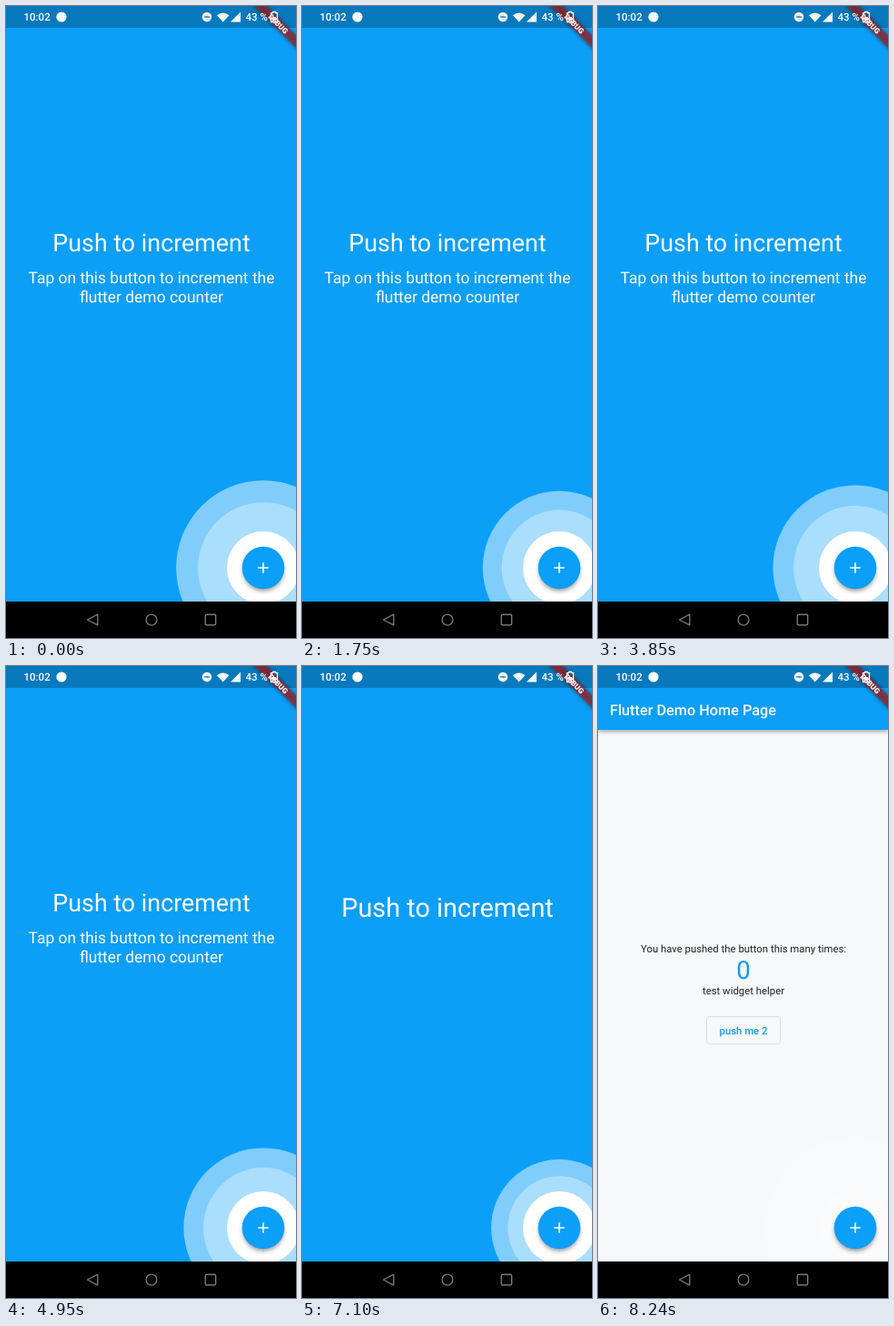
These frames come from a looping animation (319x693 px, 8340 ms). An HTML page:

```html
<!DOCTYPE html>
<html lang="en">
<head>
<meta charset="utf-8">
<style>
  html, body { margin: 0; width: 100%; height: 100%; overflow: hidden; background: #000; }
  svg { display: block; width: 319px; height: 693px; font-family: Roboto, sans-serif; text-rendering: geometricPrecision; }
  .mid { text-anchor: middle; }
  .medium { font-weight: 500; }
  .blue { fill: #0b9ff8; }
  .white { fill: #fff; }
</style>
</head>
<body>
<svg viewBox="0 0 319 693">
  <defs>
    <filter id="soft" x="-50%" y="-50%" width="200%" height="200%"><feGaussianBlur stdDeviation="2.5"/></filter>
  </defs>

  <g id="home">
    <rect width="319" height="653" fill="#fafafa"/>
    <rect y="24" width="319" height="47.5" opacity=".4" filter="url(#soft)"/>
    <rect class="blue" width="319" height="70"/>
    <text class="white medium" x="13" y="53.5" font-size="16.25">Flutter Demo Home Page</text>
    <g class="mid" font-size="11.37" fill="#222">
      <text x="160" y="314.3">You have pushed the button this many times:</text>
      <text x="160" y="342.5" font-size="27.6" fill="#159cf0">0</text>
      <text x="160" y="359.5">test widget helper</text>
      <text class="medium" x="160" y="403.7" fill="#159cf0">push me 2</text>
    </g>
    <rect x="119.5" y="384.5" width="81" height="30" rx="3" fill="none" stroke="#dfe2e5"/>
  </g>

  <g id="overlay">
    <rect class="blue" width="319" height="653"/>
    <g class="white">
      <circle id="outer" cx="283" cy="616" opacity=".48"/>
      <circle id="inner" cx="283" cy="616" opacity=".33"/>
      <circle cx="283" cy="616" r="40"/>
    </g>
    <g class="mid white">
      <text id="title" x="160" y="268.5" font-size="26.85">Push to increment</text>
      <g id="description" font-size="17.45">
        <text x="160" y="304.2">Tap on this button to increment the</text>
        <text x="160" y="325.2">flutter demo counter</text>
      </g>
    </g>
  </g>

  <g id="button">
    <circle cx="283" cy="619" r="22.5" opacity=".4" filter="url(#soft)"/>
    <circle class="blue" cx="283" cy="616" r="23.3"/>
    <path d="M277.3 616h11.4M283 610.3v11.4" stroke="#fff" stroke-width="1.7"/>
  </g>

  <rect id="status-shade" width="319" height="24" opacity=".24"/>

  <g id="banner" transform="translate(319 0) rotate(45)">
    <rect x="-40" y="22.75" width="80" height="9.75" opacity=".45" filter="url(#soft)"/>
    <rect x="-40" y="22.75" width="80" height="9.75" fill="#b71c1c" opacity=".63"/>
    <text class="mid white" y="30.6" font-size="8.3" font-weight="900">DEBUG</text>
  </g>

  <g id="status" class="white medium" font-size="11.5">
    <text x="19.5" y="16">10:02</text>
    <circle cx="61" cy="12" r="5.6"/>
    <circle cx="221" cy="12" r="5.2"/>
    <path d="M218.2 12h5.6" stroke="#0f7bbf" stroke-width="1.5"/>
    <path d="M232 10.2Q238.7 5 245.400 10.2L238.700 17.500Z"/>
    <path d="M258 6.500V17.500H247Z"/>
    <text x="263.500" y="16">43 %</text>
    <path d="M293.500 6.500h3v1.200h2v9.800h-7V7.700h2z" fill="none" stroke="#fff" stroke-width="1.3"/>
    <rect x="293" y="12" width="4" height="4"/>
  </g>

  <g id="navigation" fill="none" stroke="#777" stroke-width="1.4" stroke-linejoin="round">
    <rect y="653" width="319" height="40" fill="#000" stroke="none"/>
    <path d="M89.500 673L100.800 667.200V678.800Z"/>
    <circle cx="160" cy="673" r="5.900"/>
    <rect x="219.300" y="667.300" width="11.400" height="11.400" rx="1.500"/>
  </g>
</svg>

<script>
  const LOOP = 8340;
  const [overlay, outer, inner, title, description] =
    ['overlay', 'outer', 'inner', 'title', 'description'].map(id => document.getElementById(id));

  const progress = (t, start, end) => Math.min(1, Math.max(0, (t - start) / (end - start)));
  const smooth = p => p * p * (3 - 2 * p);

  // cubic-bezier(.4, 0, .2, 1)
  function fastOutSlowIn(x) {
    let low = 0, high = 1, s;
    for (let i = 0; i < 24; i++) {
      s = (low + high) / 2;
      const bx = 1.2 * s * (1 - s) ** 2 + 0.6 * s * s * (1 - s) + s ** 3;
      if (bx < x) low = s; else high = s;
    }
    return smooth(s);
  }

  function leave(element, centerY, grow, drop, opacity) {
    element.setAttribute('transform',
      `translate(160 ${centerY + drop}) scale(${1 + grow}) translate(-160 ${-centerY})`);
    element.setAttribute('opacity', opacity);
  }

  function draw(t) {
    const phase = (t - 375 + 2000) % 2000;
    const radius = 64.5 + 35 * fastOutSlowIn(Math.abs(1 - phase / 1000));
    outer.setAttribute('r', radius);
    inner.setAttribute('r', 56 + 0.727 * (radius - 74));

    const d = progress(t, 6550, 6950);
    leave(description, 308, 0.09 * d, 6 * d, 1 - d);
    const h = progress(t, 6900, 7300);
    leave(title, 259, 0.148 * h, 12 * h, Math.min(1, 2 - 2 * h));

    overlay.setAttribute('opacity', 1 - 0.988 * smooth(progress(t, 7690, 8220)));
  }

  function tick() {
    draw(performance.now() % LOOP);
    requestAnimationFrame(tick);
  }
  tick();
</script>
</body>
</html>
```
